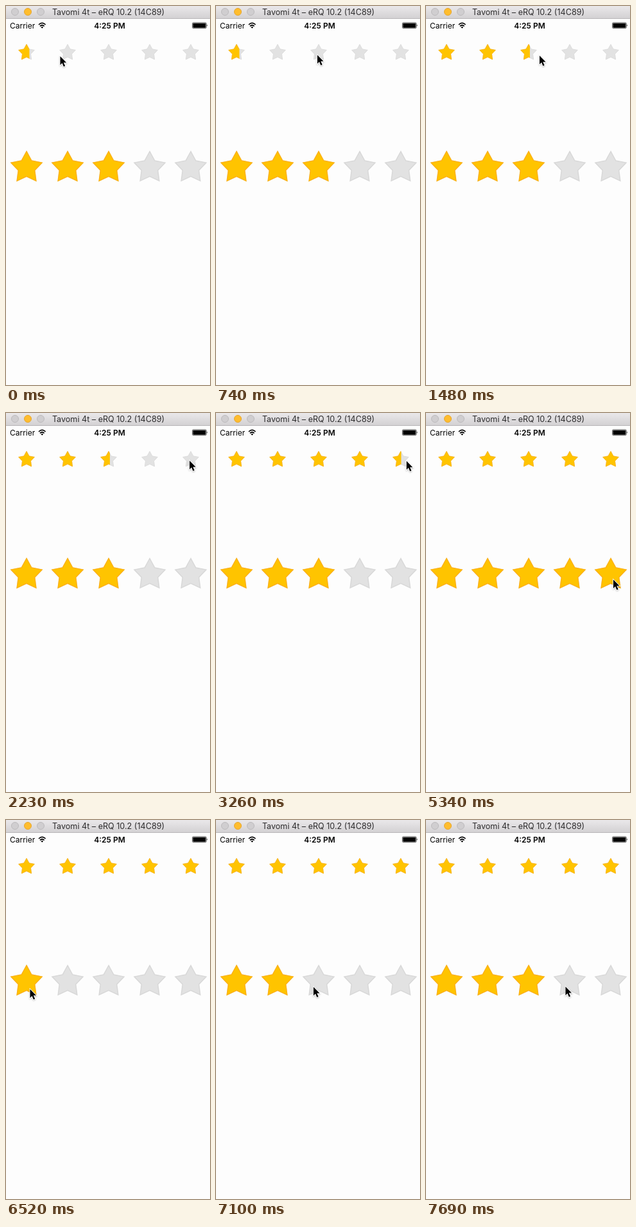
Animation, 318 px wide and 588 px high, one loop 7.99 s. Source, as an HTML page:

```html
<!DOCTYPE html>
<html lang="en">
<head>
<meta charset="utf-8">
<title>Star rating</title>
<style>
  html, body { margin: 0; width: 100%; height: 100%; overflow: hidden; background: #fdfdfd; }
  svg { display: block; width: 318px; height: 588px; }
  text { font-family: Inter, "Liberation Sans", sans-serif; }
  .empty { fill: #e2e2e2; stroke: #d8d8d8; }
  .full { fill: #ffc400; stroke: #ffb310; }
</style>
</head>
<body>
<svg viewBox="0 0 318 588">
  <defs>
    <linearGradient id="bar" x2="0" y2="1">
      <stop stop-color="#eae8ea"/>
      <stop offset="1" stop-color="#d2d0d2"/>
    </linearGradient>
    <filter id="shadow" x="-50%" y="-50%" width="200%" height="200%">
      <feDropShadow dx="0" dy="1" stdDeviation=".8" flood-opacity=".3"/>
    </filter>
  </defs>
  <rect width="318" height="588" fill="#fdfdfd"/>

  <rect width="318" height="20" fill="url(#bar)"/>
  <rect y="19" width="318" height="1" fill="#b9b7b9"/>
  <g fill="#d0ced0" stroke="#bcbabc">
    <circle cx="14" cy="9" r="5.5"/>
    <circle cx="34" cy="9" r="5.5" fill="#ffbd2e" stroke="#e5a631"/>
    <circle cx="54" cy="9" r="5.5"/>
  </g>
  <text x="159.5" y="14" text-anchor="middle" font-size="12.6" fill="#2c2b2c">Tavomi 4t – eRQ 10.2 (14C89)</text>

  <text x="6" y="34.5" font-size="12">Carrier</text>
  <g fill="none" stroke="#000" stroke-width="1.7">
    <path d="M51 29Q56.3 23.9 61.6 29M53 31.3Q56.3 28.2 59.6 31.3"/>
    <path d="M54.4 32.8Q56.3 31.1 58.2 32.8L56.3 34.8Z" fill="#000" stroke="none"/>
  </g>
  <text x="161.5" y="34.5" text-anchor="middle" font-size="12" font-weight="600">4:25 PM</text>
  <rect x="290.5" y="25.8" width="21.8" height="8.8" rx="1.6" fill="none" stroke="#000" stroke-width=".6"/>
  <rect x="291.4" y="26.7" width="20" height="7" rx=".9"/>
  <path d="M313.2 28.6Q314.8 30.2 313.2 31.8Z"/>

  <g id="rows"></g>
  <g id="cursor">
    <path d="M0 0V13.4L3 10.6L5.4 15.9L7.7 14.9L5.3 9.7H9.6Z"
      stroke="#fff" stroke-width="1.6" paint-order="stroke" filter="url(#shadow)"/>
  </g>
</svg>
<script>
const LOOP = 7990;
const STEP = 147.8; // the pointer advances in discrete steps
const CELL = 64;
const HOME = [84.5, 78];

// pointer moves: [start, end, x, y]; it rests in between
const moves = [
  [0, 740, 158, 76],
  [1040, 1480, 177, 77],
  [1480, 1780, 230, 13],
  [1780, 2080, 293, 74],
  [2080, 2230, 286, 74],
  [2530, 3260, 297, 74.5],
  [3560, 4600, 313.5, 296],
  [4600, 5040, 292, 258.5],
  [5450, 6220, 37.5, 262.5],
  [6520, 7100, 152, 259],
  [7400, 7690, 217.5, 258.5]
];

// taps: [time, rating]
const smallTaps = [[0, 0.57], [1040, 2.53], [2530, 4.51], [3560, 5]];
const bigTaps = [[0, 3], [5340, 5], [6520, 1], [6960, 2], [7400, 3]];

const rows = document.getElementById("rows");
const cursor = document.getElementById("cursor");

function star(cx, cy, r) {
  return "M" + Array.from({ length: 10 }, (_, i) => {
    const a = (i / 5 - 0.5) * Math.PI;
    const d = i % 2 ? r * 0.53 : r;
    return (cx + d * Math.cos(a)).toFixed(2) + " " + (cy + d * Math.sin(a)).toFixed(2);
  }).join("L") + "Z";
}

function addRow(id, cy, r, line) {
  const d = [0, 1, 2, 3, 4].map(i => star(CELL * (i + 0.5), cy, r)).join("");
  rows.insertAdjacentHTML("beforeend", `
    <clipPath id="${id}"><rect y="${cy - 40}" height="80"/></clipPath>
    <path class="empty" d="${d}" stroke-width="${line}"/>
    <path class="full" d="${d}" stroke-width="${line}" clip-path="url(#${id})"/>`);
  return document.querySelector(`#${id} rect`);
}

const small = addRow("small", 72.4, 13, 0.8);
const big = addRow("big", 250.9, 25.2, 1.5);

function ease(p) {
  p = Math.min(1, Math.max(0, p));
  return p * p * (3 - 2 * p);
}

function pointer(t) {
  let [x, y] = HOME;
  for (const [from, to, tx, ty] of moves) {
    const p = ease((t - from) / (to - from));
    x += (tx - x) * p;
    y += (ty - y) * p;
  }
  return [x, y];
}

function fill(clip, taps, t) {
  clip.setAttribute("width", CELL * taps.findLast(tap => tap[0] <= t)[1]);
}

function draw(t) {
  const [x, y] = pointer(Math.floor(t / STEP) * STEP);
  cursor.setAttribute("transform", `translate(${x} ${y})`);
  fill(small, smallTaps, t);
  fill(big, bigTaps, t);
}

const start = performance.now();
function tick() {
  draw((performance.now() - start) % LOOP);
  requestAnimationFrame(tick);
}
tick();
</script>
</body>
</html>
```
